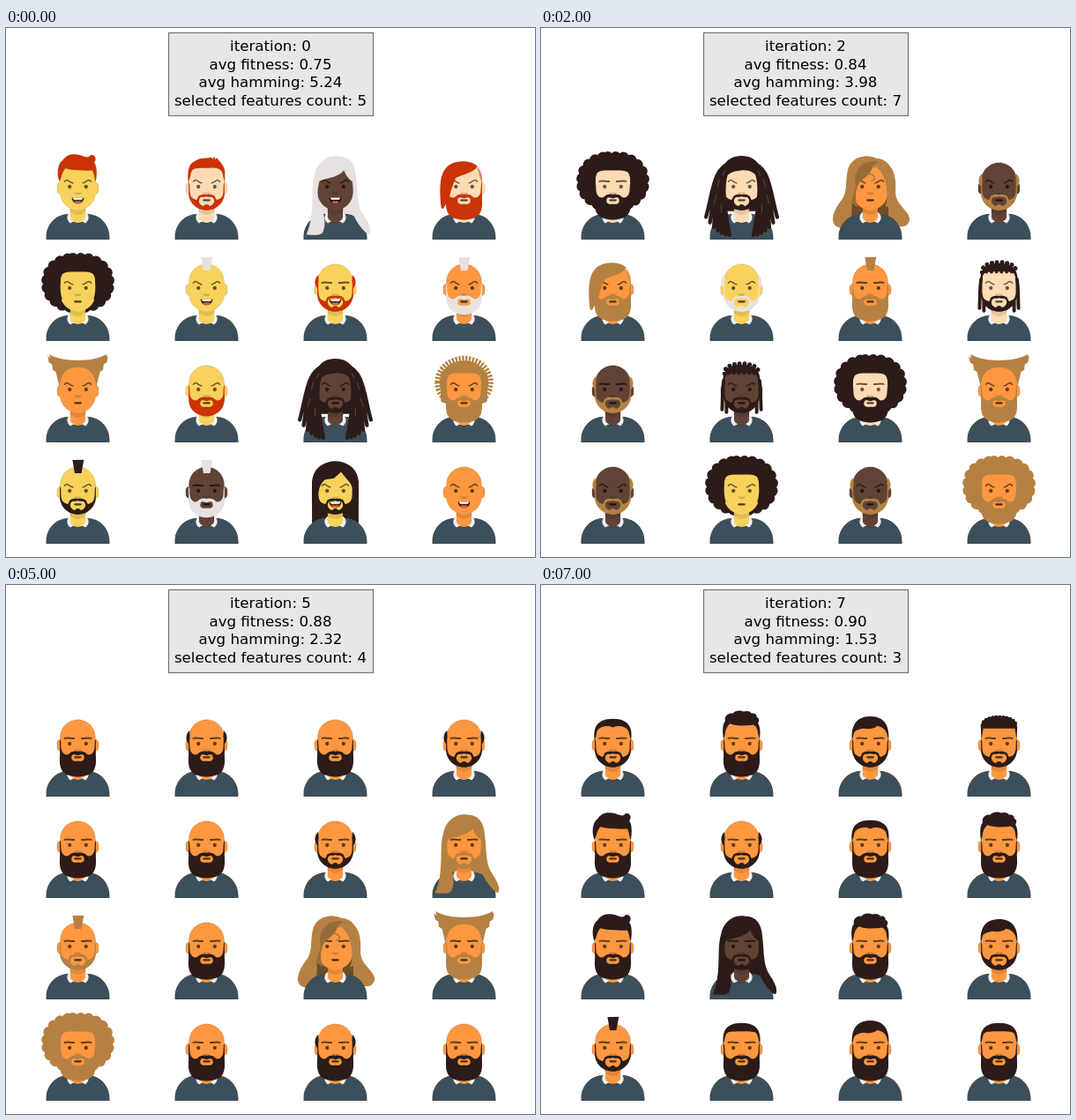
Animation of 600x600 px, one loop 8000 ms. Source, as an HTML page:

```html
<!DOCTYPE html>
<html lang="en">
<head>
<meta charset="utf-8">
<title>Genetic selection of faces</title>
<style>
  html, body { margin: 0; width: 100%; height: 100%; overflow: hidden; background: #fff; }
  #stage { display: block; width: 600px; height: 600px; }
  .gen { visibility: hidden; animation: show 8s step-end infinite; }
  @keyframes show { 0% { visibility: visible; } 12.5%, 100% { visibility: hidden; } }
  text { font: 16.67px "DejaVu Sans", sans-serif; text-anchor: middle; fill: #000; }
</style>
</head>
<body>
<svg id="stage" viewBox="0 0 600 600"></svg>
<script>
const HAIR = { r: '#c93305', g: '#e8e1e1', k: '#2c1b18', b: '#b58143' };
const SKIN = { y: '#f8d25c', o: '#fd9841', p: '#ffdbb4', d: '#614335' };

const p = (d, attrs = '') => `<path d="${d}" ${attrs}/>`;
const both = s => s + `<g transform="matrix(-1 0 0 1 264 0)">${s}</g>`;
const line = (d, w, attrs = '') =>
  p(d, `fill="none" stroke="currentColor" stroke-linecap="round" stroke-width="${w}" ${attrs}`);
const list = (n, f) => Array.from({ length: n }, (_, i) => f(i)).join(' ');
const oval = (x, y, rx, ry) => `M${x - rx},${y} a${rx},${ry} 0 1 1 ${2 * rx},0 a${rx},${ry} 0 1 1 ${-2 * rx},0Z`;
// Soft rectangle with a lobed edge
const puff = (x, y, w, h) =>
  `<rect x="${x}" y="${y}" width="${w}" height="${h}" rx="82" ry="72" stroke="currentColor" stroke-width="36" stroke-dasharray="0 25" stroke-linecap="round"/>`;
const rays = (n, r1, r2) => list(n, i => {
  const a = (-215 + i * 250 / (n - 1)) * Math.PI / 180, b = a + .12;
  return `M${132 + r1 * Math.cos(a)},${102 + r1 * Math.sin(a)}L${132 + r2 * Math.cos(b)},${102 + r2 * Math.sin(b)}`;
});

const frame = p('M58,146 V60 Q132,-10 206,60 V146 C200,158 188,158 182,146 C188,130 188,110 187,90 C187,58 170,60 132,60 S77,58 77,90 C76,110 76,130 82,146 C76,158 64,158 58,146Z');
const caesar = p('M74,102 C70,70 74,33 132,33 S194,70 190,102 L184,78 C182,66 176,62 168,61 C150,59 114,59 96,61 C88,62 82,66 80,78Z');
const knots = line('M78,62 C76,40 100,30 132,30 S188,40 186,62', 14, 'stroke-dasharray="0 16"');

// Each style: [in front of the face, behind the body]
const STYLES = {
  no: [''],
  ca: [caesar],
  ro: [p('M74,102 C70,70 74,33 132,33 S194,70 190,102 L184,82 C184,60 156,50 132,60 C108,50 80,60 80,82Z')],
  cs: [p('M74,102 C70,60 84,25 132,25 S194,60 190,102 L184,78 C178,64 168,58 154,55 C148,62 128,68 110,64 C96,66 84,70 80,78Z')],
  sh: [p('M74,100 C70,60 76,40 92,32 C110,18 140,22 148,18 L150,24 158,17 158,25 166,20 C166,28 186,36 190,62 L190,100 184,76 C182,60 172,52 150,52 C126,54 100,50 88,58 C82,64 82,70 80,80Z')],
  wv: [p('M74,96 C64,76 66,40 84,28 C96,8 120,6 140,12 C160,19 164,21 172,12 C186,8 194,24 184,36 C192,44 194,70 189,96 C184,86 184,70 178,60 C150,62 110,60 92,54 C82,66 80,82 74,96Z')],
  sc: [p('M75,98 C70,70 72,50 80,40 C76,24 92,12 104,16 C112,4 132,6 138,10 C150,6 162,10 164,16 C176,14 182,22 180,28 C190,30 188,42 184,46 C192,60 192,80 189,98 L184,80 C184,64 176,54 168,52 C150,56 110,56 96,48 C84,58 80,70 80,80Z')],
  fz: [p('M76,98 L74,60 C74,36 100,26 132,26 S190,36 190,60 L188,98 182,64 H82Z') + line('M80,54 C78,40 100,28 132,28 S186,40 184,54', 13, 'stroke-dasharray="0 11"')],
  si: [both(p('M77,114 C64,104 64,82 78,70 L79,88Z'))],
  tu: [p('M115,14 L151,13 143,56 H122Z')],
  sd: [p('M60,180 C54,140 52,80 72,56 C90,26 150,24 174,46 C168,66 130,72 106,84 C98,100 96,112 92,120 L84,150 66,182Z') + p('M172,46 C188,60 192,80 189,104 L182,80Z', 'opacity=".5"')],
  fr: [frame, puff(34, 18, 196, 154)],
  fb: [frame + p('M77,92 C72,22 192,22 187,92 C176,64 88,64 77,92Z', 'fill="#92d9ff"'), puff(18, 18, 226, 168)],
  ho: [p('M36,4 L44,14 42,0 C80,26 184,26 222,0 L226,10 229,2 224,26 214,32 212,50 202,56 190,106 C188,80 182,62 168,52 C150,38 114,38 96,52 C82,62 76,80 74,106 L62,56 52,50 50,32 40,26Z')],
  dr: [p('M74,100 C56,60 80,14 132,14 S208,60 190,100 C184,70 160,58 132,60 S80,70 74,100Z') +
       both(line(list(7, i => `M${118 - i * 3},36 C${60 - i * 3},50 ${72 - i * 5},${150 - i * 4} ${94 - i * 12.5},${266 - i * i * 1.6}`), 12) +
       line('M62,90 L56,112 M52,140 L44,166 M68,170 L68,194 M80,60 L72,76', 2, 'opacity=".3" style="color:#fff"')),
       p('M60,80 H204 V190 H60Z')],
  cu: [frame, p(oval(132, 90, 78, 70), 'stroke="currentColor" stroke-width="30" stroke-dasharray="6 4"')],
  cv: [p('M150,22 C120,8 72,16 62,60 C58,100 64,130 70,164 L92,178 C82,150 84,110 104,92 C122,80 136,64 140,46 C166,52 180,84 184,120 C188,150 182,166 180,178 L196,170 C212,140 214,70 196,50 C180,24 160,24 150,22Z') +
       line('M146,48 C114,54 124,72 138,74 C152,82 144,94 136,92', 6) +
       p('M160,32 C96,24 76,70 86,112 C82,130 70,150 72,170 L92,178 C82,150 84,110 104,92 C122,80 136,64 140,46Z', 'fill="#000" opacity=".16"'),
       p('M150,22 C120,8 70,16 60,60 C52,100 60,120 44,150 C20,180 0,220 24,238 C50,252 90,246 110,214 H180 C214,246 256,248 257,212 C250,184 214,170 212,130 C214,100 212,70 196,50 C180,24 160,24 150,22Z') +
       p('M80,70 H186 L190,210 H72Z', 'fill="#000" opacity=".4"')],
  sg: [p('M90,22 L60,40 54,70 40,100 46,104 34,140 46,138 42,160 56,158 54,176 74,174 84,186 92,178 C76,150 74,120 80,92 C96,84 116,72 132,54 C150,76 170,84 184,92 C190,120 188,150 172,178 L186,184 196,174 212,176 214,160 226,160 222,140 232,136 220,104 226,100 212,70 200,44 180,22 186,16 160,18 150,10 132,16 120,10 112,20Z')],
  bd: [frame + line(rays(14, 64, 90), 2, 'opacity=".3" style="color:#fff"'),
       p(oval(132, 102, 84, 82)) + line(rays(21, 70, 106), 17) + line(rays(21, 86, 110), 2, 'opacity=".4" style="color:#fff"')],
  mu: [p('M46,84 C58,74 56,28 108,32 C130,16 170,20 184,40 C204,60 204,90 188,104 C186,88 180,76 160,72 C140,80 114,64 112,56 C104,72 80,88 46,84Z') +
       both(p('M77,106 L76,154 C74,168 66,176 52,178 L64,182 58,188 C80,190 96,184 102,178 L84,150Z'))],
  bg: [p('M58,160 V88 C58,-6 206,-6 206,88 V160 L188,150 C190,110 186,90 170,76 L150,52 128,72 100,76 C84,86 76,110 76,150Z'),
       p('M58,232 V80 H206 V232Z')],
  st: [p('M40,264 C70,200 52,120 66,76 C74,30 110,10 144,16 C176,14 196,40 198,80 C204,130 200,170 220,200 C240,230 248,250 240,264 C226,262 190,216 180,176 C190,150 190,120 186,96 C178,88 166,80 160,60 C140,84 100,84 82,94 C74,120 74,150 84,176 C98,200 104,230 92,258 C80,268 60,266 40,264Z'),
       p('M70,80 H192 V210 H76Z')],
  d1: [caesar + knots + both(line('M75,84 C70,120 72,150 70,176 M84,154 V184', 11)) +
       line('M92,60 H174', 11, 'stroke-dasharray="0 16"')],
  d2: [caesar + knots + both(line('M78,84 C72,120 78,150 76,180', 8)) +
       line('M84,64 L90,78 M100,46 L104,70 M120,36 L122,66 M144,36 L142,66 M164,46 L160,70 M180,64 L174,78', 9, 'opacity=".4" style="color:#000"')]
};

// Right halves, mirrored at x = 132
const fullBeard = tail => both(p('M131,138 C134,136 139,136 141,136 C147,136 152,138 156,141 C160,144 162,147 167,147 C176,147 184,138 185,126 C186,117 185,106 188,98 C190,98 189,114 189,114 V140 ' + tail +
  ' V167 C140,167 149,169 152,160 C153,151 150,146 145,146 C140,146 135,148 131,149Z'));
const BEARDS = {
  0: '',
  L: both(p('M131,138 C134,136.3 139,136.4 141,136.3 C146.6,136 152,137.6 156.5,141 C160.3,144.3 160.6,152.7 163.5,153.5 C167.8,154.6 173.7,150.6 177,148 C183.3,143.6 184.8,132.8 185.4,125.7 C186,116.9 184.7,106.4 188,98 C190,98 189,114 189,114 V134 C189,149 179,172 158,181 C153,183 141,187 131,187 V168 H132 C138,168.2 140.3,172.6 140.9,172.8 C144.2,173.5 146.9,172.5 149.4,170 C154.2,165.9 158,160 155.7,153.4 C154.5,150 152.5,146.3 148.8,145.2 C145,144 139.5,145.2 135.6,144.5 C134.3,144.2 132.9,143.8 131,143Z')),
  M: fullBeard('C190,178 160,197 131,197'),
  H: fullBeard('C189,160 192,178 184,194 C176,212 150,217 131,217')
};

const BROWS = {
  a: both(line('M90,96 C95.5,89.5 98.5,90 106,95.3 S113,100 116,100', 4.2)),
  f: both(line('M90,95 C99,91 109,96 120,95', 5.5))
};
const MOUTHS = {
  s: '<rect x="120" y="152" width="24" height="6" rx="3" opacity=".7"/>',
  o: p('M113,149 C114,159 122,166 132,166 S150,159 151,149 C151,148 150,147 149,147 H115 C114,147 113,148 113,149Z', 'fill="#000" opacity=".75"') +
     p('M117,147 H147 V150 Q147,153 143,153 H121 Q117,153 117,150Z', 'fill="#fff"') +
     p('M121,162 C124,156 130,157 132,159 C134,157 140,156 143,162 Q132,169 121,162Z', 'fill="#ff4f6d"')
};

const edge = 'stroke="#000" stroke-opacity=".2" stroke-width="1.6"';
const body = p('M156,180.6 V199 H160 C200,199 232,231 232,271 V280 H32 V271 C32,231 64,199 104,199 H108 V180.6 C91,172 78,156 76,136 C70,135 66,130 66,124 V110 C66,104 70,99 76,98 V92 C76,61 101,36 132,36 S188,61 188,92 V98 C194,99 198,104 198,110 V124 C198,130 194,135 188,136 C186,156 173,172 156,180.6Z', edge);
const clothes =
  p('M108,180 C122,189 142,189 156,180 V190 C142,206 122,206 108,190Z', 'fill="#000" opacity=".1"') +
  p('M105.2,199 H104 C64,199 32,231 32,271 V280 H232 V271 C232,231 200,199 160,199 H158.8 C160,215 147,227 132,227 S104,215 105.2,199Z', `fill="#3c4f5c" ${edge}`) +
  both(p('M156,192.3 C162.2,196.8 166,203 166,210 C166,217.2 161.9,223.7 155.2,228.3 L149.6,223.9 145,224.2 146,221 C152,218 156,212.7 156,206.9Z', 'fill="#f2f2f2"'));
const eyes = both('<circle cx="106" cy="112" r="6" opacity=".6"/>') +
  p('M120,130 C120,134.4 125.4,138 132,138 S144,134.4 144,130Z', 'opacity=".16"');

function face(code, i) {
  const [front, back = ''] = STYLES[code.slice(0, 2)];
  const [hair, skin, chin, mouth, brow] = code.slice(2);
  const x = 81.5 + 146 * (i % 4) - 47.14, y = 140 + 115 * Math.floor(i / 4);
  return `<svg x="${x}" y="${y}" width="94.28" height="100" viewBox="0 0 264 280" color="${HAIR[hair]}" fill="currentColor">
    ${back}<g fill="${SKIN[skin]}">${body}</g>${clothes}
    <g fill="#000" color="#000">${eyes}<g opacity=".6">${BROWS[brow]}</g>${MOUTHS[mouth]}</g>
    ${BEARDS[chin]}${front}</svg>`;
}

// Style, hair colour, skin, beard, mouth, brow
const GENERATIONS = [
  ['0.75', '5.24', 5, 'wvry0oa shrpLsa stgd0oa sdrpHsa frky0sa tugy0oa siryLof tugoMsa hobo0sa noryMsa drkdLsa cuboHsa tukyLsa tugdMsf bgkyLoa noko0oa'],
  ['0.80', '4.60', 5, 'carpLsa rorpLsa cvky0sa sibdLsa sgkdLsa frbo0sa sdkpLsa fzrpLsa tubdLsa tukd0oa scrp0sa fbboHsa bdboHsa tuboHsf mukyLoa tuboHsf'],
  ['0.84', '3.98', 7, 'frkpHsf drkpLsa cvbo0sa sibdLsa sdboHsa sigyLsa tuboHsf d1kpLsa sibdLsf d1kdLsa frkpHsf hoboHsa sibdLsa frky0sa sibdLsa frboHsa'],
  ['0.85', '3.82', 3, 'sdboHsa sgboLsf d2boHsa stkdLsa siboLsf muboLsf nokoHsf fbkpLsa drkpHsf frboHsa siboLsf sibdLsa nokoHsf cakoHsa d1kpHsf shgyLsa'],
  ['0.87', '2.98', 4, 'nokoHsf siboLsf nokoHsf siboLsf frboHsa nokoHsf sikoHsf stboLsf siboLsf nokoHsf cvbo0sf hoboHsa nokoHsf cakoHsf tuboLsf nokoHsf'],
  ['0.88', '2.32', 4, 'nokoHsf sikoHsf nokoHsf sikoLsf nokoHsf nokoHsf sikoLsf stboLsf tuboLsf nokoHsf cvbo0sf hoboHsf frboHsf nokoHsf sikoHsf nokoHsf'],
  ['0.89', '1.85', 3, 'nokoHsf cakoHsf sikoHsf rokoLsf sikoHsf nokoHsf cakoLsf sckoHsf nokoHsf sikoLsf wvkoHsf nokoHsf tukoLsf nokoHsf sikoHsf cakoHsf'],
  ['0.90', '1.53', 3, 'rokoLsf sckoHsf cskoLsf fzkoLsf wvkoHsf sikoLsf rokoHsf sckoHsf wvkoHsf stkdLsf sckoHsf cskoLsf tukoLsf cakoHsf cskoHsf cakoHsf']
];

const header = (n, fitness, hamming, count) =>
  [`iteration: ${n}`, `avg fitness: ${fitness}`, `avg hamming: ${hamming}`, `selected features count: ${count}`]
    .map((s, i) => `<text x="300" y="${26 + Math.round(i * 20.7)}">${s}</text>`).join('');

document.getElementById('stage').innerHTML =
  '<rect x="184.5" y="5.5" width="232" height="94" fill="#e7e7e7" stroke="#737373" stroke-width="1.2"/>' +
  GENERATIONS.map(([fit, ham, count, faces], n) =>
    `<g class="gen" style="animation-delay:${n ? n - 8 : 0}s">${header(n, fit, ham, count)}${faces.split(' ').map(face).join('')}</g>`).join('');
</script>
</body>
</html>
```
